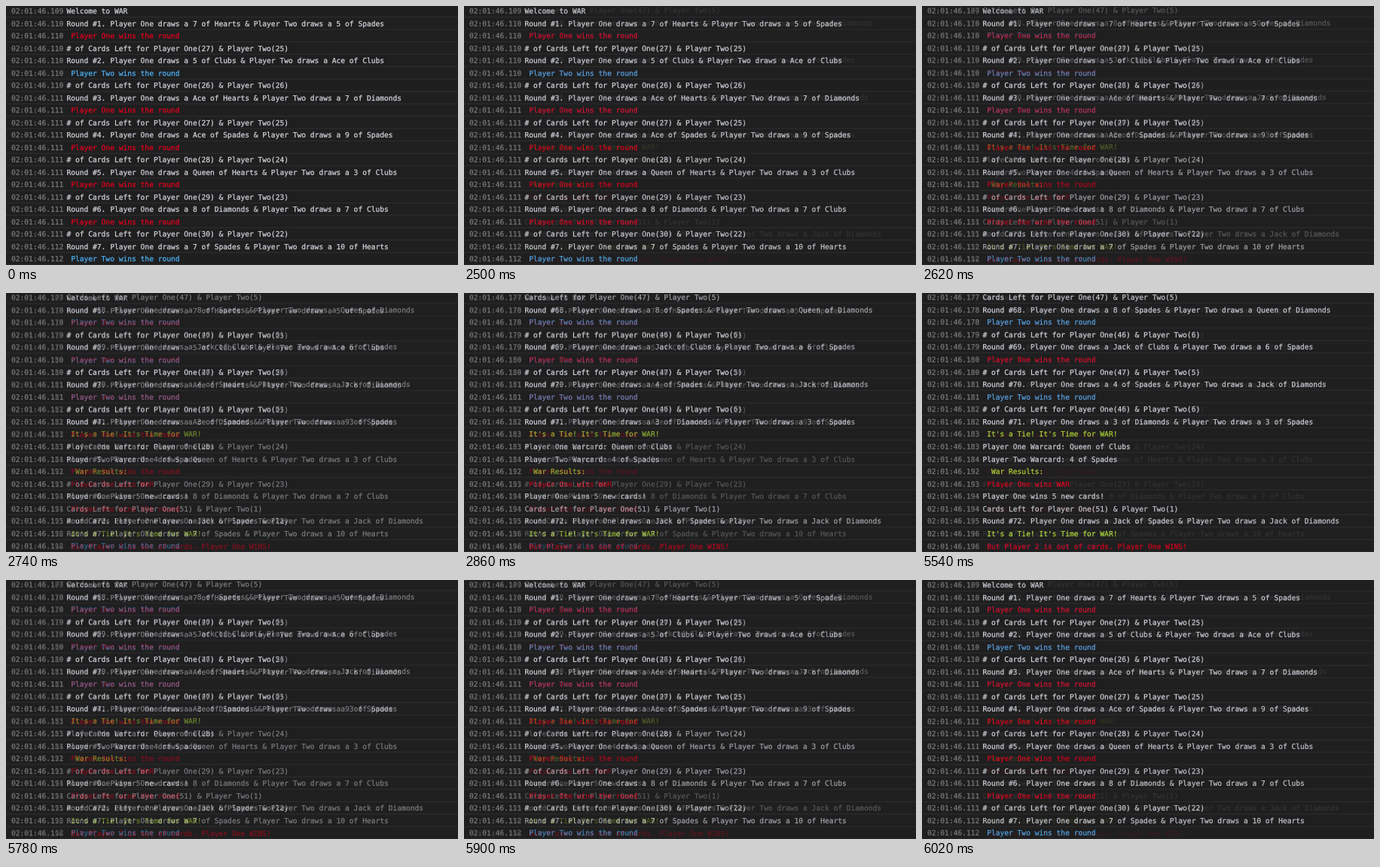
An HTML page for the animation above (6080 ms loop, 600x345 px).

```html
<!DOCTYPE html>
<html lang="en">
<head>
<meta charset="utf-8">
<title>War console</title>
<style>
  html, body { margin: 0; width: 100%; height: 100%; overflow: hidden; background: #1f1f20; }
  svg { display: block; width: 600px; height: 345px; }
  text {
    font: 9.61px "DejaVu Sans Mono", monospace;
    text-rendering: geometricPrecision;
    white-space: pre;
    stroke-width: 0.25px;
  }
</style>
</head>
<body>
<svg id="stage" viewBox="0 0 600 345"></svg>
<script>
const COLORS = { log: '#d0d4da', time: '#7a7a7b', red: '#e2001c', blue: '#4db2f5', lime: '#b4e03a' };
const BACKGROUND = '#1f1f20', DIVIDER = '#2f2f30';
const HOLD = 2500, STEP = 60, LOOP = 6080, SECOND = 3040;

const log = (ms, text, color = 'log') => ({ ms, text, color });
const draw = (ms, n, one, two) =>
  log(ms, `Round #${n}. Player One draws a ${one} & Player Two draws a ${two}`);
const win = (ms, who) =>
  log(ms, ` Player ${who} wins the round`, who === 'One' ? 'red' : 'blue');
const left = (ms, one, prefix = '# of ') =>
  log(ms, `${prefix}Cards Left for Player One(${one}) & Player Two(${52 - one})`);
const tie = ms => log(ms, " It's a Tie! It's Time for WAR!", 'lime');

const opening = [
  log(109, 'Welcome to WAR'),
  draw(110, 1, '7 of Hearts', '5 of Spades'),
  win(110, 'One'),
  left(110, 27),
  draw(110, 2, '5 of Clubs', 'Ace of Clubs'),
  win(110, 'Two'),
  left(110, 26),
  draw(111, 3, 'Ace of Hearts', '7 of Diamonds'),
  win(111, 'One'),
  left(111, 27),
  draw(111, 4, 'Ace of Spades', '9 of Spades'),
  win(111, 'One'),
  left(111, 28),
  draw(111, 5, 'Queen of Hearts', '3 of Clubs'),
  win(111, 'One'),
  left(111, 29),
  draw(111, 6, '8 of Diamonds', '7 of Clubs'),
  win(111, 'One'),
  left(111, 30),
  draw(112, 7, '7 of Spades', '10 of Hearts'),
  win(112, 'Two')
];

const ending = [
  left(177, 47, ''),
  draw(178, 68, '8 of Spades', 'Queen of Diamonds'),
  win(178, 'Two'),
  left(179, 46),
  draw(179, 69, 'Jack of Clubs', '6 of Spades'),
  win(180, 'One'),
  left(180, 47),
  draw(181, 70, '4 of Spades', 'Jack of Diamonds'),
  win(181, 'Two'),
  left(182, 46),
  draw(182, 71, '3 of Diamonds', '3 of Spades'),
  tie(183),
  log(183, 'Player One Warcard: Queen of Clubs'),
  log(184, 'Player Two Warcard: 4 of Spades'),
  log(192, '  War Results:', 'lime'),
  log(193, ' Player One wins WAR', 'red'),
  log(194, 'Player One wins 5 new cards!'),
  left(194, 51, ''),
  draw(195, 72, 'Jack of Spades', 'Jack of Diamonds'),
  tie(196),
  log(196, ' But Player 2 is out of cards. Player One WINS!', 'red')
];

const stage = document.getElementById('stage');

function add(parent, tag, attrs, text = '') {
  const node = document.createElementNS('http://www.w3.org/2000/svg', tag);
  for (const name in attrs) node.setAttribute(name, attrs[name]);
  node.textContent = text;
  return parent.appendChild(node);
}

function addText(parent, x, y, color, text) {
  add(parent, 'text', { x, y, fill: color, stroke: color }, text);
}

function addScreen(rows, firstBaseline, pitch) {
  const screen = add(stage, 'g', {});
  add(screen, 'rect', { width: 600, height: 345, fill: BACKGROUND });
  rows.forEach(({ ms, text, color }, i) => {
    const y = firstBaseline + i * pitch;
    add(screen, 'rect', { y: y + 4, width: 600, height: 1, fill: DIVIDER });
    addText(screen, 7, y, COLORS.time, `02:01:46.${ms}`);
    addText(screen, 80.4, y, COLORS[color], text);
  });
  return screen;
}

addScreen(opening, 10.3, 16.5);
const overlay = addScreen(ending, 9.1, 16.57);

// Each fade advances by a tenth every STEP, starting as soon as the hold ends.
const fade = t => t < HOLD ? 0 : Math.min(10, Math.floor((t - HOLD) / STEP) + 1) / 10;

function frame() {
  const t = performance.now() % LOOP;
  const amount = t < SECOND ? fade(t) : 1 - fade(t - SECOND);
  overlay.setAttribute('opacity', amount);
  requestAnimationFrame(frame);
}
frame();
</script>
</body>
</html>
```
